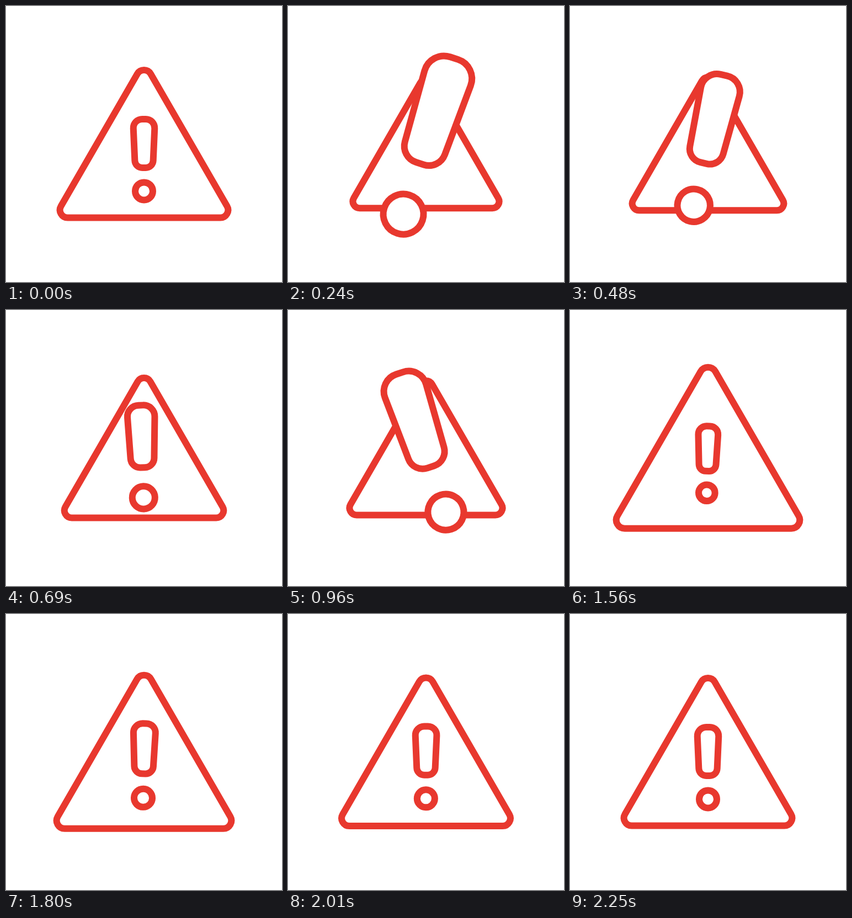
Recreate the animation shown at these times as an HTML page with a canvas. Size 500 by 500 pixels, loop 2280 ms.

```html
<!DOCTYPE html>
<html lang="en">
<head>
<meta charset="utf-8">
<title>Warning sign</title>
<style>
  html, body { margin: 0; height: 100%; overflow: hidden; background: #fff; }
  canvas { display: block; }
</style>
</head>
<body>
<canvas id="stage" width="500" height="500"></canvas>
<script>
const ctx = document.getElementById('stage').getContext('2d');
const LOOP = 2280, STEP = 30;
// Swing right, pass the middle, swing left and hold, let go, settle
const RIGHT = 285, MIDDLE = 690, LEFT = 1120, RELEASE = 1220, POP = 1640;

const smooth = u => u * u * (3 - 2 * u);
const settle = u => 1 - (1 - u) ** 4;

// Eases through [time, value] turning points and settles back to the rest value
function track(rest, ...turns) {
  const points = [[0, rest], ...turns, [LOOP, rest]];
  return t => {
    const i = points.findIndex(([time]) => time > t);
    const [t0, v0] = points[i - 1], [t1, v1] = points[i];
    const ease = i === points.length - 1 ? settle : smooth;
    return v0 + (v1 - v0) * ease((t - t0) / (t1 - t0));
  };
}

const signSize = track(1, [RIGHT, 0.861], [MIDDLE, 0.947], [RELEASE + 60, 0.861], [POP, 1.125]);
const markSize = track(1, [RIGHT, 2.37], [MIDDLE, 1.284], [LEFT, 2.375], [RELEASE, 2.375],
  [POP - 50, 0.9], [POP + 160, 1.035]);
const markAngle = track(0, [RIGHT, 19.3], [LEFT - 60, -20.2], [RELEASE, -20.2], [POP, 3.6]);
const markDrift = track(0, [RIGHT, -0.8], [MIDDLE, -3], [LEFT, 0.3], [POP, -1]);

// Corners are [x, y, radius]
function roundedPolygon(corners) {
  const [first] = corners, last = corners[corners.length - 1];
  ctx.moveTo((first[0] + last[0]) / 2, (first[1] + last[1]) / 2);
  corners.forEach(([x, y, r], i) => {
    const next = corners[(i + 1) % corners.length];
    ctx.arcTo(x, y, next[0], next[1], r);
  });
  ctx.closePath();
}

// The outline is transformed, the line weight is not
function drawShape(x, y, scale, degrees, outline) {
  ctx.save();
  ctx.translate(x, y);
  ctx.rotate(degrees * Math.PI / 180);
  ctx.scale(scale, scale);
  ctx.beginPath();
  outline();
  ctx.restore();
  ctx.fill();
  ctx.stroke();
}

const triangle = () => roundedPolygon([[0, -148, 14], [162.5, 133.5, 14], [-162.5, 133.5, 14]]);
const bar = () => roundedPolygon([
  [-20, -73.3, 16], [20, -73.3, 16], [16.1, 14.7, 13.5], [-16.1, 14.7, 13.5]
]);
const dot = () => ctx.arc(0, 57.1, 16, 0, 2 * Math.PI);

function draw(t) {
  const size = markSize(t);
  const x = 250 + markDrift(t);
  const y = 278.3 - 22 * Math.sqrt(Math.max(0, size - 1)); // lifts as it grows
  ctx.fillStyle = '#fff';
  ctx.strokeStyle = '#e8382e';
  ctx.lineWidth = 12;
  ctx.fillRect(0, 0, 500, 500);
  drawShape(250, 250, signSize(t), 0, triangle);
  drawShape(x, y, size, markAngle(t), bar);
  drawShape(x, y, size, markAngle(t), dot);
}

const start = performance.now();
function tick() {
  const t = (performance.now() - start) % LOOP;
  draw(Math.floor(t / STEP) * STEP);
  requestAnimationFrame(tick);
}
tick();
</script>
</body>
</html>
```
